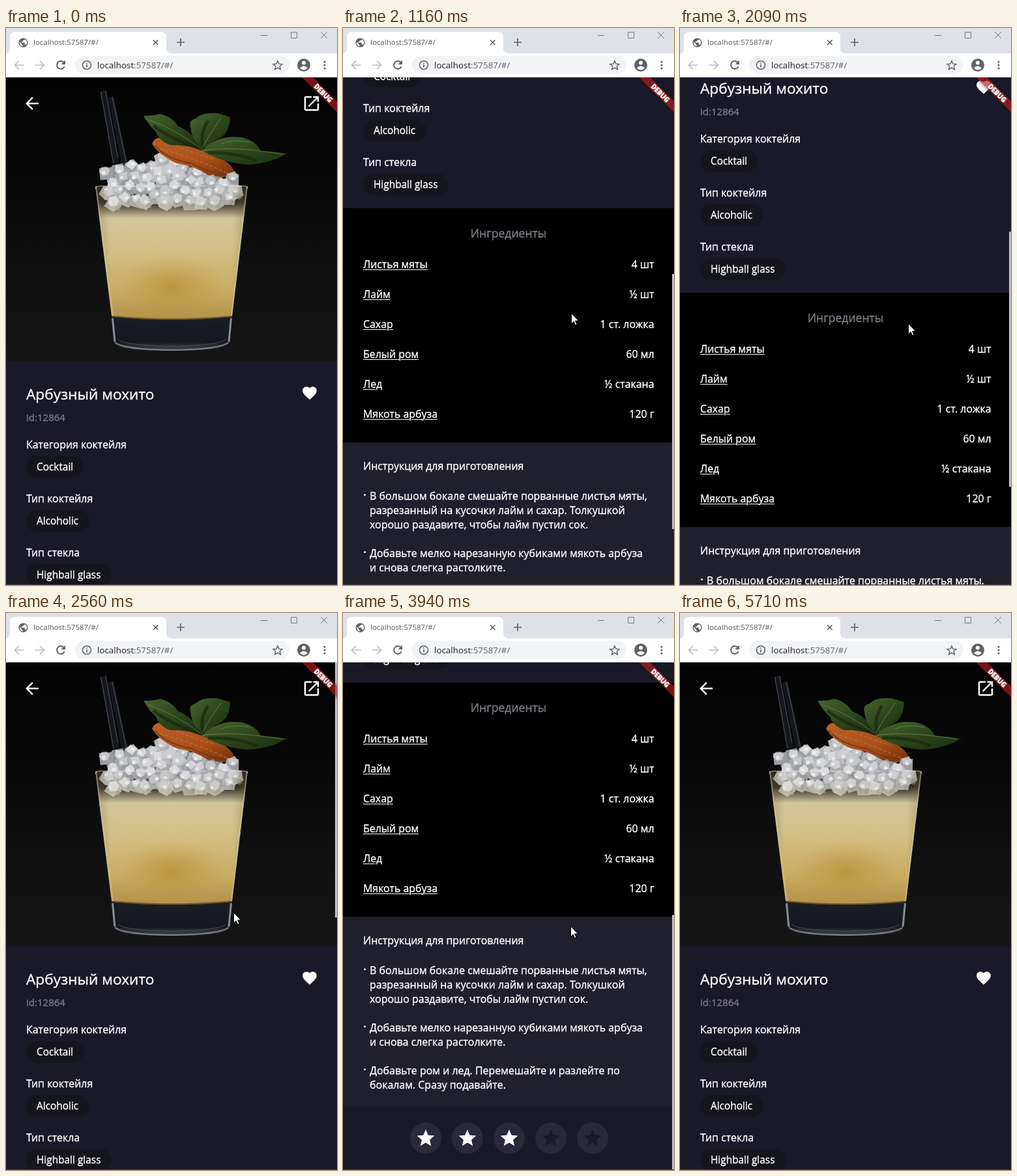
An HTML page for the animation above (6.11 s loop, 508 by 856 pixels).

```html
<!DOCTYPE html>
<html lang="ru">
<head>
<meta charset="utf-8">
<title>Cocktail details</title>
<style>
html, body { margin: 0; width: 100%; height: 100%; overflow: hidden; background: #1a1927; }
body { position: relative; font-family: "Open Sans", "Noto Sans", sans-serif; }
#bar, #cursor, #view, #doc, #thumb, #ribbon, #edge, .box, .t, .icon { position: absolute; }
#bar { left: 0; top: 0; }
#view { left: 0; top: 76px; width: 508px; height: 780px; overflow: hidden; }
#doc { left: 0; top: -76px; width: 508px; height: 1626px; will-change: transform; }
#thumb { left: 505px; top: 0; width: 3px; height: 392px; background: #bdbdc2; }
#ribbon { left: 447px; top: 18px; width: 80px; height: 12px; transform: rotate(45deg);
  background: rgba(183, 28, 28, .66); box-shadow: 0 0 6px rgba(0, 0, 0, .5); -webkit-text-stroke: .4px;
  color: #fff; font: 800 10.2px/12px "Open Sans", sans-serif; text-align: center; }
#edge { left: 0; top: 855px; width: 508px; height: 1px; background: #45413f; }
#cursor { left: 0; top: 0; }
.t { white-space: pre; line-height: 24px; -webkit-text-stroke: .35px; }
.link { text-decoration: underline 1px; text-underline-offset: 2px; }
</style>
</head>
<body>
<svg id="bar" width="508" height="76">
  <rect width="508" height="76" fill="#dee1e6"/>
  <path d="M0 39Q6 38 6 31V14Q6 6 14 6H238Q246 6 246 14V31Q246 38 254 39Z" fill="#fff"/>
  <path d="M0 39H508V75H0Z" fill="#fff"/>
  <path d="M0 75.5H508" stroke="#d5d7da"/>
  <rect x="106" y="43" width="329" height="28" rx="14" fill="#f1f3f4"/>
  <g fill="none" stroke="#5f6368" stroke-width="1.7">
    <path d="M226 18.5l7.5 7.5m0-7.5l-7.5 7.5M262 22h12M268 16v12"/>
    <path d="M27.500 57H13.500M20 50.500L13.500 57 20 63.500M44.500 57H58.500M52 50.500L58.500 57 52 63.500" stroke="#bcbec1"/>
    <path d="M88.700 53A6 6 0 1 0 89.700 59" stroke-width="2"/>
    <circle cx="124" cy="57" r="6.500" stroke-width="1.500"/>
    <path d="M124 56v4.500M124 53v1.600"/>
    <path d="M417 50.500l2 4.600 5 .4-3.800 3.300 1.200 4.900-4.400-2.600-4.400 2.600 1.200-4.900-3.800-3.300 5-.4z" stroke-width="1.400"/>
  </g>
  <path d="M391 11.500h10M437.500 6.500h9v9h-9zM483 6l10 10m0-10l-10 10" fill="none" stroke="#777a7e"/>
  <circle cx="457" cy="57" r="10" fill="#5f6368"/>
  <circle cx="457" cy="53.500" r="3" fill="#fff"/>
  <path d="M451 61.500Q457 55.500 463 61.500Q457 67.500 451 61.500Z" fill="#fff"/>
  <g fill="#5f6368">
    <path d="M91 49.500V56H84.500Z"/>
    <circle cx="489" cy="52" r="1.600"/><circle cx="489" cy="57" r="1.600"/><circle cx="489" cy="62" r="1.600"/>
  </g>
  <text x="42" y="26" font-size="11.5" fill="#54585c">localhost:57587/#/</text>
  <text x="140" y="62" font-size="13.4" fill="#202124">localhost<tspan fill="#5f6368">:57587/#/</tspan></text>
</svg>

<div id="view">
  <div id="doc">
    <svg class="icon" style="left:0;top:76px" width="508" height="436" viewBox="0 76 508 436">
      <defs>
        <linearGradient id="back" x2="0" y2="1"><stop stop-color="#020202"/><stop offset="1" stop-color="#151515"/></linearGradient>
        <linearGradient id="juice" x2="0" y2="1">
          <stop stop-color="#d6cbaa" stop-opacity="0"/><stop offset=".12" stop-color="#d6cbaa" stop-opacity=".15"/>
          <stop offset=".24" stop-color="#d4c69c"/><stop offset=".5" stop-color="#d3be83"/>
          <stop offset=".8" stop-color="#c8aa5f"/><stop offset="1" stop-color="#b3914a"/>
        </linearGradient>
        <linearGradient id="side">
          <stop stop-color="#6e6040" stop-opacity=".45"/><stop offset=".1" stop-color="#8a7a4d" stop-opacity="0"/>
          <stop offset=".9" stop-color="#8a7a4d" stop-opacity="0"/><stop offset="1" stop-color="#6e6040" stop-opacity=".45"/>
        </linearGradient>
        <radialGradient id="glow"><stop stop-color="#b98f35" stop-opacity=".75"/><stop offset="1" stop-color="#c3983a" stop-opacity="0"/></radialGradient>
        <linearGradient id="base" x2="0" y2="1"><stop stop-color="#1b1d27"/><stop offset=".75" stop-color="#16181f"/><stop offset="1" stop-color="#45484f"/></linearGradient>
        <linearGradient id="leaf" x2="1" y2="1"><stop stop-color="#48652f"/><stop offset=".5" stop-color="#2c461c"/><stop offset="1" stop-color="#1a2c10"/></linearGradient>
        <linearGradient id="peel" x2="1" y2="1"><stop stop-color="#b9602a"/><stop offset=".6" stop-color="#a84e1a"/><stop offset="1" stop-color="#70300f"/></linearGradient>
      </defs>
      <rect y="76" width="508" height="436" fill="url(#back)"/>
      <path d="M149 97L169 208M161 106L182 208" stroke="#14171b" stroke-width="9"/>
      <path d="M145.500 98L165 208M153 97L172 200M163 106L185 208" stroke="#454a52" stroke-width="1.300"/>
      <g id="ice"></g>
      <path d="M224 178Q228 167 240 169Q290 182 330 200Q350 212 352 226Q340 232 310 226Q290 212 262 208Q235 196 224 178Z" fill="url(#peel)"/>
      <path d="M229 184Q275 194 342 224M246 174Q285 192 320 202" fill="none" stroke="#d0763a" stroke-width="2" stroke-dasharray="5 3" opacity=".5"/>
      <path d="M228 181Q250 203 285 208Q315 225 350 226" fill="none" stroke="#6d3013" stroke-width="2" opacity=".7"/>
      <g fill="url(#leaf)">
        <path d="M211 135Q228 135 236 132Q255 136 264 151Q285 158 302 187Q275 179 252 180Q235 174 230 159Q221 152 211 135Z"/>
        <path d="M283 152Q280 142 291 139Q300 129 325 131L344 137Q343 165 322 172L303 187Q285 173 283 152Z"/>
        <path d="M300 188Q326 163 362 168Q385 174 391 189Q415 190 432 193Q405 208 375 210Q335 209 300 188Z"/>
      </g>
      <path d="M226 150Q255 172 300 186M303 186Q296 166 310 142M310 192Q350 190 385 204" fill="none" stroke="#13210b" stroke-width="5" opacity=".55"/>
      <path d="M218 141Q260 155 300 186Q314 160 330 138M302 188Q350 181 425 194M330 178Q350 170 375 176" fill="none" stroke="#82985e" opacity=".6"/>
      <g id="iceFront"></g>
      <path d="M137 243H371L347 443Q255 452 162 443Z" fill="url(#juice)"/>
      <ellipse cx="255" cy="398" rx="80" ry="50" fill="url(#glow)"/>
      <path d="M137 243H371L347 443Q255 452 162 443Z" fill="url(#side)"/>
      <path d="M162 443Q255 452 347 443L344 483Q340 496 254 496Q168 496 165 483Z" fill="url(#base)"/>
      <path d="M162 443Q255 452 347 443" fill="none" stroke="#6b5522" stroke-width="2"/>
      <path d="M163.500 446L167 482M345.500 446L342 482" stroke="#b0b2b8" stroke-width="3" opacity=".75"/>
      <path d="M167 483Q180 494 254 495Q328 494 342 483" fill="none" stroke="#92959b" stroke-width="2" opacity=".8"/>
      <path d="M172 479Q185 488 254 489Q323 488 337 479" fill="none" stroke="#6a6d75" opacity=".6"/>
      <path d="M138 243L164 443M370 243L346 443" stroke="#d8d2c0" stroke-width="2" opacity=".45"/>
      <path d="M137 247Q138 242 150 243H360Q371 242 371 247" fill="none" stroke="#e4e6e9" stroke-width="1.500" opacity=".5"/>
    </svg>
  </div>
  <div id="thumb"></div>
  <div id="ribbon">DEBUG</div>
</div>
<div id="edge"></div>
<svg id="cursor" width="13" height="20"><path d="M.5.5V16.500L4.200 13 6.600 18.600 9 17.600 6.600 12H11.500Z" fill="#fff" stroke="#000"/></svg>

<script>
const NS = "http://www.w3.org/2000/svg";
const LOOP = 6110;
const $ = id => document.getElementById(id);
const doc = $("doc");

const ICONS = {
  back: "M20 11H7.83l5.59-5.59L12 4l-8 8 8 8 1.41-1.41L7.83 13H20v-2z",
  open: "M19 19H5V5h7V3H5c-1.11 0-2 .9-2 2v14c0 1.1.89 2 2 2h14c1.1 0 2-.9 2-2v-7h-2v7zM14 3v2h3.59l-9.83 9.83 1.41 1.41L19 6.41V10h2V3h-7z",
  heart: "M12 21.35l-1.45-1.32C5.4 15.36 2 12.28 2 8.5 2 5.42 4.42 3 7.5 3c1.74 0 3.41.81 4.5 2.09C13.09 3.81 14.76 3 16.5 3 19.58 3 22 5.42 22 8.5c0 3.78-3.4 6.86-8.55 11.54L12 21.35z",
  star: "M12 17.27L18.18 21l-1.64-7.03L22 9.24l-7.19-.61L12 2 9.19 8.63 2 9.24l5.46 4.73L5.82 21z",
  globe: "M12 2C6.48 2 2 6.48 2 12s4.48 10 10 10 10-4.48 10-10S17.52 2 12 2zm-1 17.93c-3.95-.49-7-3.85-7-7.93 0-.62.08-1.21.21-1.79L9 15v1c0 1.1.9 2 2 2v1.93zm6.9-2.54c-.26-.81-1-1.39-1.9-1.39h-1v-3c0-.55-.45-1-1-1H8v-2h2c.55 0 1-.45 1-1V7h2c1.1 0 2-.9 2-2v-.41c2.93 1.19 5 4.06 5 7.41 0 2.08-.8 3.97-2.1 5.39z"
};

function svg(tag, attrs, parent) {
  const el = document.createElementNS(NS, tag);
  for (const k in attrs) el.setAttribute(k, attrs[k]);
  return parent.appendChild(el);
}

function icon(name, cx, cy, size, fill, parent = doc) {
  const el = svg("svg", { class: "icon", width: size, height: size, viewBox: "0 0 24 24" }, parent);
  el.style.left = cx - size / 2 + "px";
  el.style.top = cy - size / 2 + "px";
  svg("path", { d: ICONS[name], fill }, el);
}

function box(x, y, w, h, color, radius = 0) {
  const el = document.createElement("div");
  el.className = "box";
  el.style.cssText = `left:${x}px;top:${y}px;width:${w}px;height:${h}px;background:${color};border-radius:${radius}px`;
  doc.append(el);
}

// y is the middle of the line; align may be left, right or center.
function text(str, x, y, size = 15.95, color = "#fff", align = "left", cls = "") {
  const el = document.createElement("div");
  el.className = "t " + cls;
  el.textContent = str;
  const side = align === "right" ? `right:${508 - x}px` : align === "center" ? "left:0;width:508px;text-align:center" : `left:${x}px`;
  el.style.cssText = `${side};top:${y - 12}px;font-size:${size}px;color:${color}`;
  doc.append(el);
}

// Ice: seeded cubes under a bumpy skyline, each with a lit and a dark face.
let seed = 11;
const rnd = () => (seed = seed * 16807 % 2147483647) / 2147483647;
const skyline = x => 209 - 15 * Math.exp(-(((x - 238) / 20) ** 2)) + 4 * Math.sin(x / 11) + Math.max(0, x - 305) * .35;

function facet(cx, cy, r, light, alpha, parent) {
  const n = 4 + Math.floor(rnd() * 3), turn = rnd() * 6.28;
  const pts = Array.from({ length: n }, (_, i) => {
    const a = turn + i / n * 6.28, d = r * (.8 + rnd() * .35);
    return (cx + d * Math.cos(a)).toFixed(1) + "," + (cy + d * Math.sin(a) * .9).toFixed(1);
  });
  svg("polygon", { points: pts.join(" "), fill: `hsl(220 4% ${light}%)`, opacity: alpha }, parent);
}

function cube(x, y) {
  const layer = $(x < 225 || y > 228 ? "iceFront" : "ice");
  facet(x, y, 15, 62 + rnd() * 18, .92, layer);
  facet(x - 3 + rnd() * 4, y - 4, 9, 80 + rnd() * 12, .8, layer);
  facet(x + 6, y + 6, 5, 48 + rnd() * 20, .6, layer);
  facet(x - 6 + rnd() * 8, y - 6 + rnd() * 8, 3.5, 96, .75, layer);
}

for (let row = 0; row < 5; row++) {
  for (let x = 157 + row % 2 * 8; x < 360; x += 17) {
    const y = skyline(x) + 11 + row * 16;
    if (y < 274) cube(x + rnd() * 6 - 3, y + rnd() * 6 - 3);
  }
}

icon("globe", 26, 22, 17, "#5f6368", document.body);
icon("back", 40, 116, 30, "#fff");
icon("open", 469, 116, 30, "#fff");

const GREY = "#7b7a84";
box(0, 512, 508, 365, "#1a1927");
box(0, 877, 508, 360, "#000");
box(0, 1237, 508, 292, "#201f2c");
box(0, 1529, 508, 97, "#1a1927");

text("Арбузный мохито", 31, 563, 22.7);
icon("heart", 466, 561, 26, "#fff");
text("id:12864", 31, 598, 15, GREY);

[["Категория коктейля", "Cocktail", 88], ["Тип коктейля", "Alcoholic", 97], ["Тип стекла", "Highball glass", 131]]
  .forEach(([label, value, w], i) => {
    const y = 640 + i * 83;
    text(label, 31, y);
    box(31, y + 18, w, 33, "#15151c", 17);
    text(value, 47, y + 35, 15.4);
  });

text("Ингредиенты", 0, 915, 17.6, GREY, "center");
[["Листья мяты", "4 шт"], ["Лайм", "½ шт"], ["Сахар", "1 ст. ложка"], ["Белый ром", "60 мл"], ["Лед", "½ стакана"], ["Мякоть арбуза", "120 г"]]
  .forEach(([name, amount], i) => {
    text(name, 31, 963 + i * 46, 15.9, "#fff", "left", "link");
    text(amount, 477.5, 963 + i * 46, 15.9, "#fff", "right");
  });

text("Инструкция для приготовления", 31, 1273);
let lineY = 1319;
for (const step of [
  ["В большом бокале смешайте порванные листья мяты,", "разрезанный на кусочки лайм и сахар. Толкушкой", "хорошо раздавите, чтобы лайм пустил сок."],
  ["Добавьте мелко нарезанную кубиками мякоть арбуза", "и снова слегка растолите.".replace("растолите", "растолките")],
  ["Добавьте ром и лед. Перемешайте и разлейте по", "бокалам. Сразу подавайте."]
]) {
  box(32, lineY - 3, 3, 3, "#fff", 2);
  for (const line of step) {
    text(line, 41, lineY);
    lineY += 22;
  }
  lineY += 22;
}

for (let i = 0; i < 5; i++) {
  const x = 126.5 + i * 64;
  box(x - 24, 1553, 48, 48, "#2a293a", 24);
  icon("star", x, 1577, 32, i < 3 ? "#fff" : "#1a1927");
}

// Wheel ticks: [ms, scroll offset]
const scroll = [
  [0, 0], [760, 100], [840, 200], [920, 300], [1000, 400], [1080, 500], [1160, 600], [1390, 700], [1470, 770],
  [2010, 670], [2090, 470], [2160, 370], [2330, 270], [2410, 170], [2490, 70], [2560, 0],
  [3170, 100], [3250, 200], [3330, 300], [3410, 400], [3480, 500], [3560, 600], [3940, 770],
  [4250, 670], [4330, 570], [4400, 470], [4480, 370], [4650, 270], [4710, 170], [4790, 70], [4870, 0]
];

// Pointer rests: [ms, x, y]
const rests = [
  [760, 350, 424], [920, 350, 431], [1160, 350, 438], [1540, 350, 443], [1620, 350, 448], [1690, 350, 454],
  [2330, 350, 457], [2490, 349, 460], [2640, 348, 463], [2870, 348, 464], [3170, 348, 467], [3560, 349, 474],
  [3940, 349, 481], [4020, 349, 485], [4100, 350, 489], [4180, 350, 493], [4480, 351, 498], [4870, 349, 501], [5020, 352, 514]
];
const mix = (a, b, k) => a + (b - a) * k;
const enter = Array.from({ length: 8 }, (_, i) => {
  const k = 1 - (1 - i / 7) ** 2;
  return [70 + i * 77, mix(490, 350, k), mix(811, 419, k)];
});
const leave = Array.from({ length: 7 }, (_, i) => {
  const k = (i / 6) ** 1.6;
  return [5170 + i * 77, mix(354, 480, k), mix(524, 846, k)];
});

function play(el, rows, frame) {
  const frames = rows.map(r => ({ offset: r[0] / LOOP, easing: "step-end", ...frame(r) }));
  frames.push({ ...frames[frames.length - 1], offset: 1 });
  const run = el.animate(frames, { duration: LOOP, iterations: Infinity });
  run.startTime = document.timeline.currentTime;
}

const shift = (x, y) => `translate(${Math.round(x)}px, ${Math.round(y)}px)`;
play(doc, scroll, r => ({ transform: shift(0, -r[1]) }));
play($("thumb"), scroll, r => ({ transform: shift(0, r[1] * 388 / 770) }));
play($("thumb"), [[0, 0], [760, 1], [5480, .75], [5560, .5], [5640, .25], [5710, 0]], r => ({ opacity: r[1] }));
play($("cursor"), [[0, 490, 900], ...enter, ...rests, ...leave, [5710, 490, 900]], r => ({ transform: shift(r[1], r[2]) }));
</script>
</body>
</html>
```
